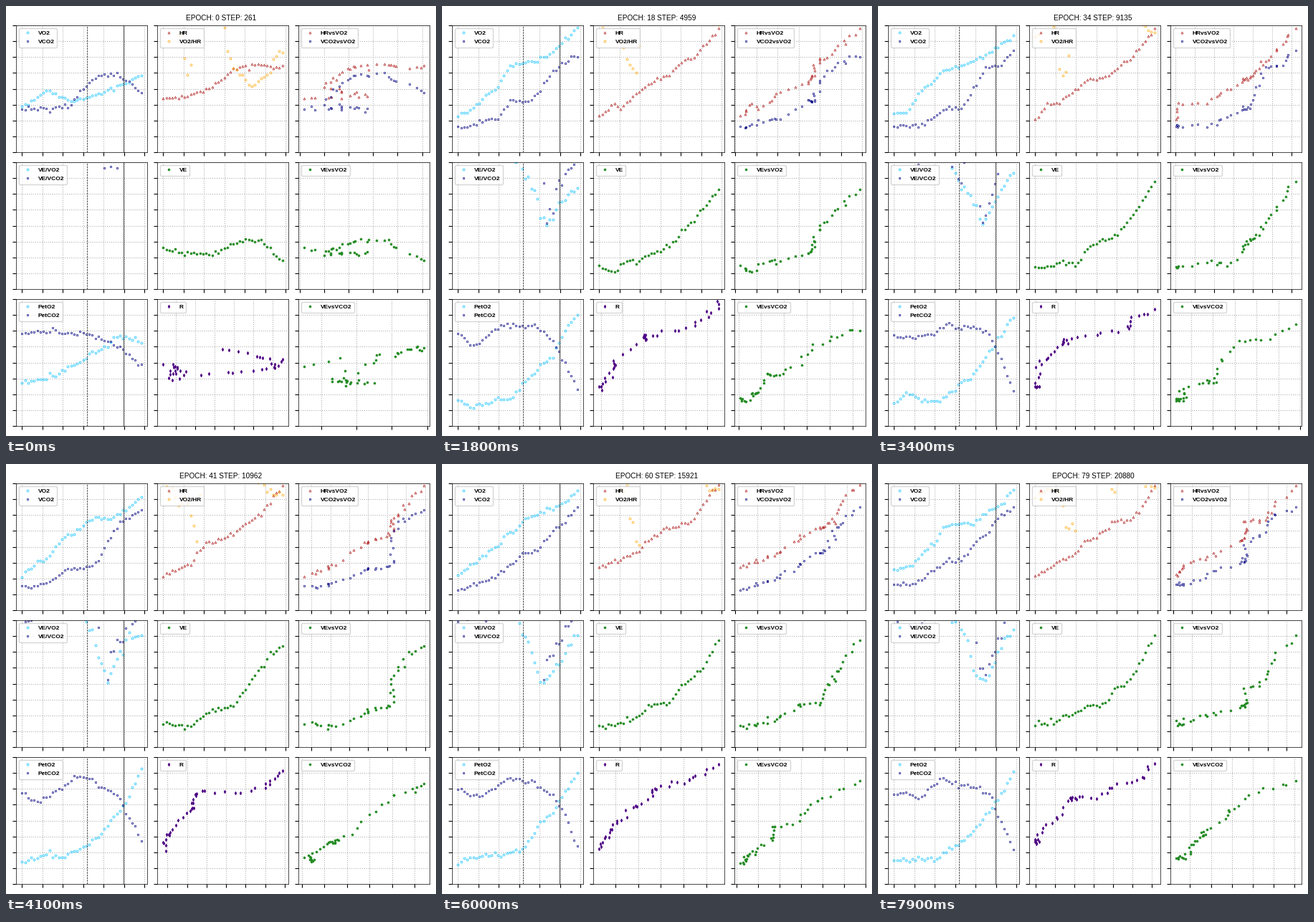
Recreate the animation shown at these times as a matplotlib script. Size 600x600 px, loop 8100 ms.

```python
import numpy as np
import matplotlib.pyplot as plt
from matplotlib.animation import FuncAnimation
from matplotlib.ticker import MultipleLocator

EPOCHS, STEPS_PER_EPOCH, POINTS = 80, 261, 40
LEARNING_EPOCHS = 6
TIME = 3.0 * np.arange(POINTS)
SKY, NAVY, RED = "deepskyblue", "navy", "firebrick"
ORANGE, GREEN, INDIGO = "orange", "forestgreen", "indigo"

plt.rcParams.update({"font.family": "Liberation Sans", "font.size": 6,
                     "axes.linewidth": 0.5})

# Typical course of each signal at evenly spaced times, scaled to -1..1.
UNTRAINED = {
    "VO2": (-0.27, -0.03, -0.19, -0.11, 0.02, 0.18),
    "VCO2": (-0.31, -0.33, -0.27, 0.19, 0.22, -0.03),
    "HR": (-0.14, -0.14, 0.04, 0.31, 0.38, 0.34),
    "VE": (-0.36, -0.45, -0.45, -0.27, -0.2, -0.56),
    "PetO2": (-0.33, -0.25, -0.08, 0.16, 0.41, 0.33),
    "PetCO2": (0.47, 0.5, 0.47, 0.45, 0.27, -0.05),
}
TRAINED = {
    "VO2": (-0.4, -0.2, 0.23, 0.4, 0.55, 0.84),
    "VCO2": (-0.6, -0.55, -0.34, -0.2, 0.31, 0.63),
    "HR": (-0.41, -0.23, 0.06, 0.23, 0.51, 0.95),
    "VE": (-0.66, -0.65, -0.45, -0.29, 0.13, 0.66),
    "PetO2": (-0.63, -0.6, -0.56, -0.3, 0.15, 0.73),
    "PetCO2": (0.36, 0.37, 0.63, 0.63, 0.42, -0.41),
}


def spread(knots):
    """Stretch a few values evenly over all points."""
    return np.interp(np.linspace(0, 1, POINTS), np.linspace(0, 1, len(knots)), knots)


def sample(epoch):
    """All signals generated in one epoch: learned shape, slow drift and jitter."""
    rng = np.random.default_rng(epoch)
    skill = min(epoch / LEARNING_EPOCHS, 1)
    data = {}
    for name in TRAINED:
        shape = (1 - skill) * spread(UNTRAINED[name]) + skill * spread(TRAINED[name])
        drift = skill * spread(rng.normal(0, 0.05, 10))
        data[name] = shape + drift + rng.normal(0, 0.02, POINTS)
    for top, bottom in (("VO2", "HR"), ("VE", "VO2"), ("VE", "VCO2")):
        data[f"{top}/{bottom}"] = np.abs(data[top] / data[bottom])
    data["time"] = TIME
    return data


# Each panel: x signal, then (label, y signal, marker, colour) per series.
PANELS = [
    ("time", [("VO2", "VO2", "o", SKY), ("VCO2", "VCO2", "s", NAVY)]),
    ("time", [("HR", "HR", "^", RED), ("VO2/HR", "VO2/HR", "o", ORANGE)]),
    ("VO2", [("HRvsVO2", "HR", "^", RED), ("VCO2vsVO2", "VCO2", "s", NAVY)]),
    ("time", [("VE/VO2", "VE/VO2", "o", SKY), ("VE/VCO2", "VE/VCO2", "s", NAVY)]),
    ("time", [("VE", "VE", "o", GREEN)]),
    ("VO2", [("VEvsVO2", "VE", "o", GREEN)]),
    ("time", [("PetO2", "PetO2", "o", SKY), ("PetCO2", "PetCO2", "s", NAVY)]),
    ("VCO2", [("R", "VO2", "d", INDIGO)]),
    ("VE", [("VEvsVCO2", "VCO2", "o", GREEN)]),
]
SIZES = {"o": 2.1, "s": 1.9, "^": 2.1, "d": 2.3}


def fit_x(ax, x):
    margin = 0.05 * np.ptp(x)
    ax.set_xlim(x.min() - margin, x.max() + margin)


# Panels of 183 x 177 pixels with gaps of 14.
fig, axes = plt.subplots(3, 3, figsize=(6, 6), dpi=100)
fig.subplots_adjust(left=14 / 600, right=591 / 600, bottom=14 / 600, top=573 / 600,
                    wspace=14 / 183, hspace=14 / 177)
title = fig.suptitle("")

lines = []
for n, (ax, (x_name, series)) in enumerate(zip(axes.flat, PANELS)):
    ax.set_ylim(-1, 1)
    ax.yaxis.set_major_locator(MultipleLocator(0.25))
    ax.tick_params(labelleft=False, labelbottom=False)
    ax.grid(linestyle=":")
    ax.set_axisbelow(True)
    fit_x(ax, TIME)
    for label, y_name, marker, color in series:
        fill = color if color in (GREEN, INDIGO) else "none"
        line, = ax.plot([], [], marker, ms=SIZES[marker], mew=0.5, mec=color,
                        mfc=fill, label=label)
        lines.append((ax, line, x_name, y_name))
    if n % 3 == 0:
        ax.axvline(63.7, color="black", linestyle="--", linewidth=0.5)
        ax.axvline(99.6, color="black", linewidth=0.5)
    ax.legend(loc="upper left", prop={"weight": "bold", "size": 6})


def update(frame):
    epoch = min(frame, EPOCHS - 1)
    data = sample(epoch)
    title.set_text(f"EPOCH: {epoch} STEP: {STEPS_PER_EPOCH * (epoch + 1)}")
    for ax, line, x_name, y_name in lines:
        line.set_data(data[x_name], data[y_name])
        if x_name != "time":
            fit_x(ax, data[x_name])
    return [title] + [line for _, line, _, _ in lines]


# The last epoch is held for one extra tick.
anim = FuncAnimation(fig, update, frames=EPOCHS + 1, interval=100,
                     repeat=True, repeat_delay=0, blit=False)
plt.show()
```
